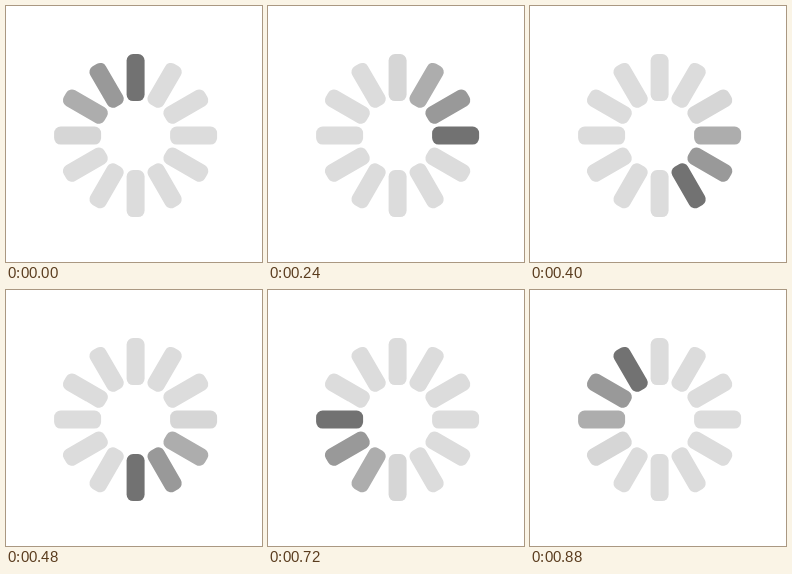
Recreate the animation shown at these times as an HTML page. Size 256 px wide and 256 px high, loop 0.96 s.

```html
<!DOCTYPE html>
<html lang="en">
<head>
<meta charset="utf-8">
<title>Loading</title>
<style>
  html, body {
    margin: 0;
    width: 100%;
    height: 100%;
    overflow: hidden;
    background: #fff;
  }
  svg { display: block; width: 100vw; height: 100vh; }
  .bar {
    fill: #dcdcdc;
    animation: fade 960ms step-end infinite;
    animation-delay: calc((var(--i) - 12) * 80ms);
  }
  /* Each step is one twelfth of the loop. */
  @keyframes fade {
    0% { fill: #727272; }
    8.3333% { fill: #999; }
    16.6666% { fill: #adadad; }
    25% { fill: #d6d6d6; }
    33.3333%, 100% { fill: #dcdcdc; }
  }
</style>
</head>
<body>
<svg id="spinner" viewBox="0 0 256 256"></svg>
<script>
  const COUNT = 12, CX = 129.6, CY = 129.6;
  const bar = i => `<rect class="bar" style="--i:${i}" x="${CX - 9}" y="${CY - 81.5}"
    width="18" height="47" rx="6.5" transform="rotate(${i * 360 / COUNT} ${CX} ${CY})"/>`;
  document.getElementById('spinner').innerHTML =
    Array.from({ length: COUNT }, (_, i) => bar(i)).join('');
</script>
</body>
</html>
```
